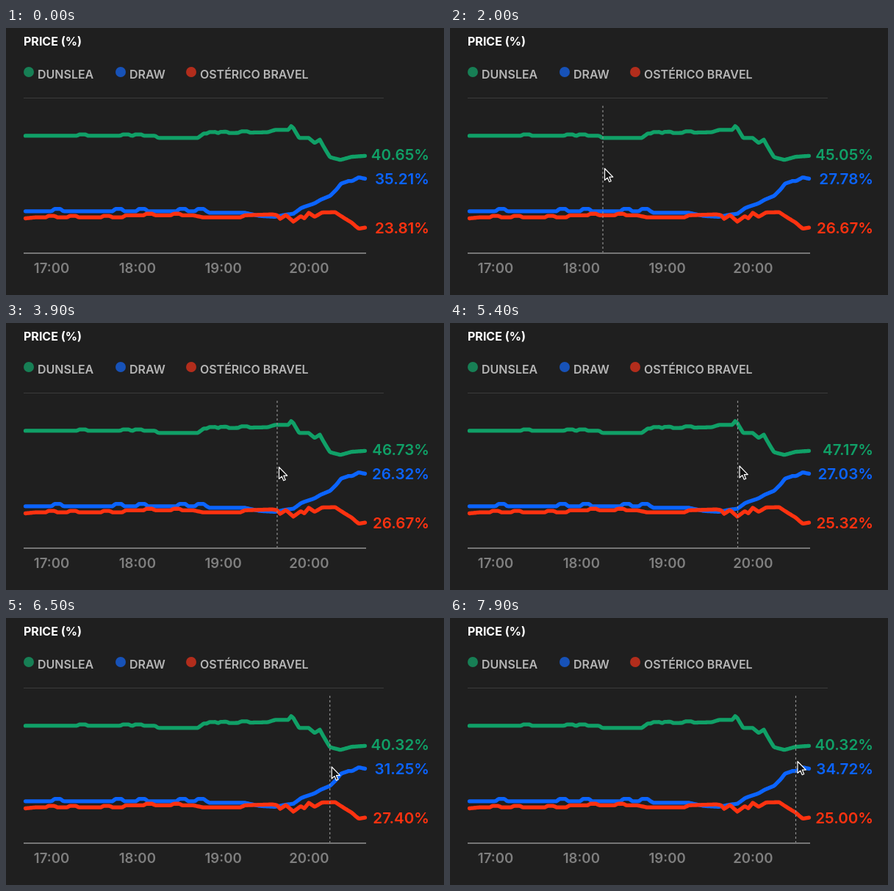
An HTML page that plays this animation: 596x364 px, repeating every 8000 ms.

```html
<!DOCTYPE html>
<html lang="en">
<head>
<meta charset="utf-8">
<title>Price chart</title>
<style>
  html, body { margin: 0; width: 100%; height: 100%; overflow: hidden; background: #1f1f1f; }
  svg { display: block; width: 596px; height: 364px; font-family: Inter, Roboto, sans-serif; font-weight: 600; }
  .title { font-size: 16px; font-weight: 700; fill: #fff; }
  .legend { font-size: 16px; fill: #b5b5b5; }
  .hours { font-size: 18.6px; fill: #7f7f7f; text-anchor: middle; }
  .values { font-size: 20.6px; text-anchor: end; }
  .curves { fill: none; stroke-width: 5.3; stroke-linecap: round; stroke-linejoin: round; }
</style>
</head>
<body>
<svg viewBox="0 0 596 364">
  <text class="title" x="24" y="24">PRICE (%)</text>
  <g class="legend" id="legend"></g>
  <path d="M24 95.5H514" stroke="#3b3b3b"/>
  <path d="M24 307H490" stroke="#929292" stroke-width="1.6"/>
  <g class="hours" id="hours"></g>
  <g class="curves" id="curves"></g>
  <g class="values" id="values"></g>
  <g id="pointer">
    <path id="guide" d="M0 106V306" stroke="#8d8d8d" stroke-width="1.2" stroke-dasharray="3 3"/>
    <path id="arrow" d="M0 0V16L3.7 12.6L6.2 18.3L8.7 17.2L6.3 11.6H11.3Z" fill="#111" stroke="#fff" stroke-width="1.2" stroke-linejoin="round"/>
  </g>
</svg>
<script>
const LOOP = 8000, FRAME = 100, LEFT = 26.5, RIGHT = 489;
const $ = id => document.getElementById(id);

// trend: [x, decimal odds]; bumps: centres of brief dips in the odds
const series = [
  { name: 'DUNSLEA', legendX: 31, dot: '#177f55', color: '#10a067', y: 180,
    trend: [[24, 2.205], [203, 2.205], [207, 2.229], [261, 2.229], [269, 2.18], [356, 2.165], [366, 2.14],
      [384, 2.14], [388, 2.1], [391, 2.12], [399, 2.23], [412, 2.23], [420, 2.29], [427, 2.25],
      [441, 2.48], [455, 2.52], [470, 2.475], [490, 2.46]],
    bumps: [104, 163, 180, 281, 296, 324], depth: 0.015 },
  { name: 'DRAW', legendX: 156, dot: '#1752b8', color: '#0b64ff', y: 213,
    trend: [[24, 3.62], [273, 3.62], [277, 3.67], [325, 3.67], [345, 3.77], [365, 3.8], [384, 3.72],
      [391, 3.7], [402, 3.52], [420, 3.39], [428, 3.3], [441, 3.2], [450, 3.05], [456, 2.93],
      [466, 2.88], [471, 2.88], [480, 2.81], [490, 2.84]],
    bumps: [70, 153, 185, 240, 265], depth: 0.07 },
  { name: 'OSTÉRICO BRAVEL', legendX: 252, dot: '#b22d1c', color: '#ff3210', y: 280,
    trend: [[24, 3.86], [40, 3.82], [158, 3.82], [163, 3.75], [255, 3.75], [268, 3.82], [319, 3.82],
      [325, 3.75], [363, 3.72], [369, 3.75], [373, 3.87], [381, 3.74], [391, 3.97], [401, 3.78],
      [406, 3.85], [412, 3.67], [420, 3.8], [430, 3.66], [448, 3.65], [470, 4], [480, 4.25], [490, 4.2]],
    bumps: [62, 91, 137, 195, 232], depth: 0.05 },
];

// [ms, guide x, arrow y]
const moves = [
  [100, 25, 197], [400, 27, 196], [1100, 134, 193], [1500, 134, 193], [2000, 208, 191.5],
  [2600, 268, 199], [2800, 268, 199], [2900, 272.7, 200.5], [3900, 369, 196.5], [4300, 388, 195],
  [5300, 388, 195], [5400, 391.5, 195], [6500, 440.7, 203], [7100, 456, 199], [7500, 470.5, 195.5],
];

// linear interpolation over rows keyed by their first column
function at(rows, k) {
  const i = rows.findIndex(r => r[0] >= k);
  if (i < 0) return rows[rows.length - 1];
  if (!i) return rows[0];
  const a = rows[i - 1], b = rows[i], f = (k - a[0]) / (b[0] - a[0]);
  return a.map((v, j) => v + (b[j] - v) * f);
}

// each bump is a trapezoid 16 wide with a plateau of 8
function oddsAt(s, x) {
  const bump = Math.max(...s.bumps.map(c => Math.min(1, Math.max(0, (8 - Math.abs(x - c)) / 4))));
  return at(s.trend, x)[1] - s.depth * bump;
}

const priceY = odds => 410 - 580 / odds;

// quoted odds move in coarser steps as they grow
function priceText(odds) {
  const step = odds < 3 ? 0.02 : odds < 4 ? 0.05 : 0.1;
  return (100 / (Math.round(odds / step) * step)).toFixed(2) + '%';
}

function add(parent, tag, attrs, text = '') {
  const el = document.createElementNS('http://www.w3.org/2000/svg', tag);
  for (const k in attrs) el.setAttribute(k, attrs[k]);
  el.textContent = text;
  return $(parent).appendChild(el);
}

for (const s of series) {
  add('legend', 'circle', { cx: s.legendX, cy: 60, r: 7, fill: s.dot });
  add('legend', 'text', { x: s.legendX + 12, y: 68.6 }, s.name);
  const points = [];
  for (let x = LEFT; x <= RIGHT; x += 1.5) points.push([x, priceY(oddsAt(s, x))]);
  add('curves', 'polyline', { points: points.join(' '), stroke: s.color });
  s.label = add('values', 'text', { x: 576, y: s.y, fill: s.color });
}
for (let h = 0; h < 4; h++) add('hours', 'text', { x: 62 + h * 116.8, y: 334 }, `${17 + h}:00`);

function draw(now) {
  const t = Math.floor((now % LOOP) / FRAME) * FRAME;
  const [, x, y] = at(moves, t), active = t >= moves[0][0];
  $('pointer').setAttribute('visibility', active ? 'visible' : 'hidden');
  $('guide').setAttribute('transform', `translate(${x})`);
  $('arrow').setAttribute('transform', `translate(${x + 2.5} ${y})`);
  for (const s of series) s.label.textContent = priceText(oddsAt(s, active ? x : RIGHT + 1));
}

const start = performance.now();
function tick() {
  draw(performance.now() - start);
  requestAnimationFrame(tick);
}
tick();
</script>
</body>
</html>
```
